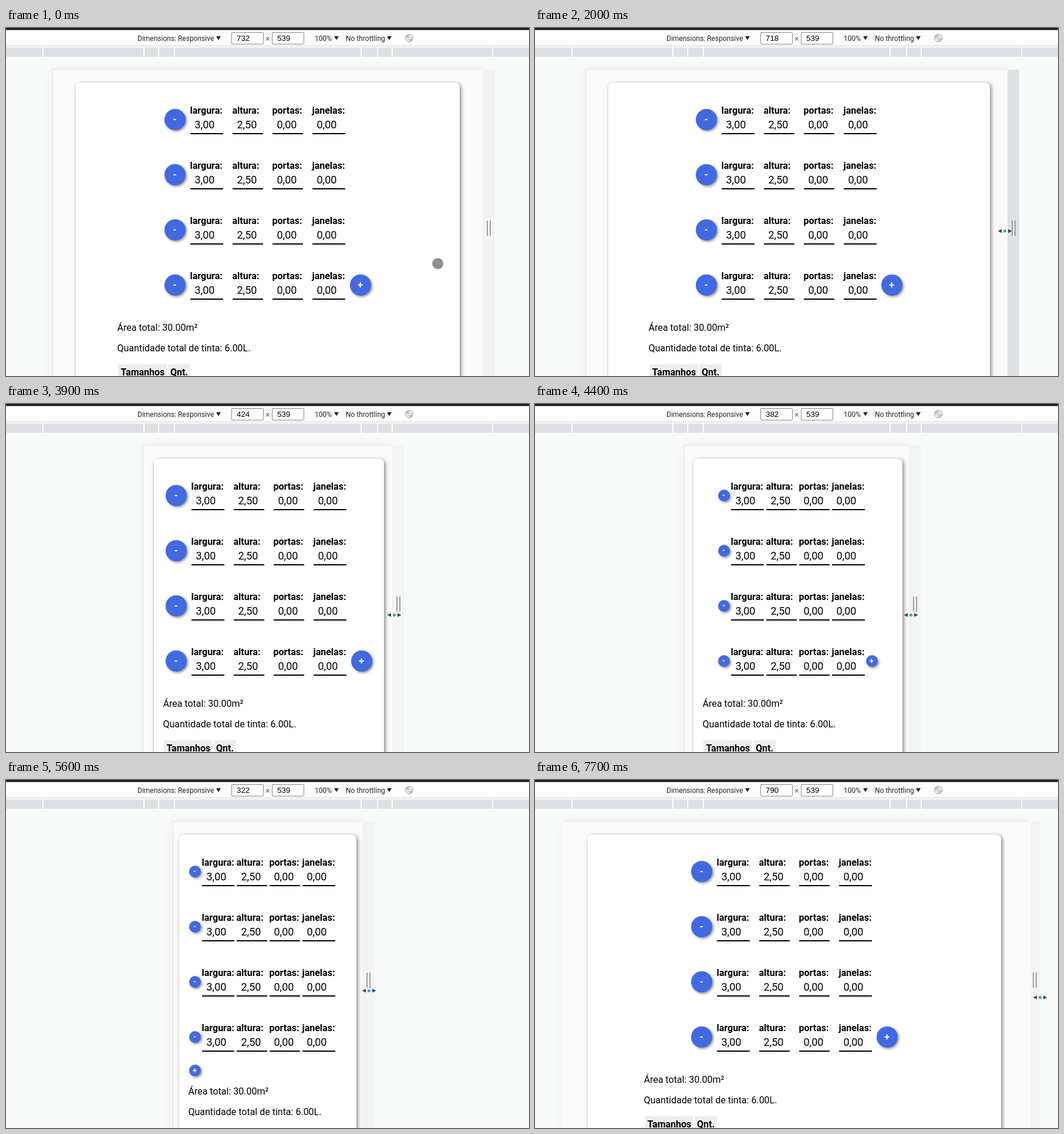
Write an HTML page that moves like this. It is 891 px wide and 593 px high and loops after 8 s.

```html
<!DOCTYPE html>
<html lang="pt">
<head>
<meta charset="utf-8">
<title>Responsive form</title>
<style>
html, body { margin: 0; width: 100%; height: 100%; overflow: hidden; }
body { position: relative; background: #f8faf9; font: 16px Roboto, sans-serif; color: #000; }
div, span, svg { position: absolute; white-space: nowrap; }
svg { left: 0; top: 0; }
#tools { width: 891px; height: 49px; background: #fff; font-size: 12px; color: #202124; }
#tools span { top: 11px; }
.field { top: 7px; width: 53px; height: 19px; border: 1px solid #85858a; border-radius: 2px; background: #fff;
  font: 13.333px "Liberation Sans", Arial, sans-serif; color: #000; }
#tools .field span { left: 8px; top: 2px; }
#frame, #bar, #page { top: 71px; height: 539px; }
#frame { box-shadow: -1px -1px 0 #e2e3e3, 0 0 20px rgba(0,0,0,.05); }
#bar { width: 20px; background: #f1f3f4; }
#bar.hover { background: #dee1e6; }
#bar i { position: absolute; top: 257px; width: 2px; height: 26px; background: #a0a0a0; }
#page { background: #fafafa; overflow: hidden; }
#content { top: -71px; }
#card { top: 93px; height: 600px; background: #fff; border-radius: 8px; box-shadow: 2px 2px 6px rgba(0,0,0,.5); }
.row { left: -176px; display: flex; align-items: center; }
.row > div { position: relative; flex: none; }
.btn { width: 36px; height: 36px; border-radius: 50%; background: #4169e1; color: #fff; font-weight: bold;
  line-height: 36px; text-align: center; box-shadow: 2px 2px 4px rgba(0,0,0,.45); }
.col { width: 52px; height: 48px; margin: 0 8px; border-bottom: 2px solid #000; }
.wide { width: 56px; }
.col b { position: absolute; left: 0; }
.col span { left: 8px; top: 23px; font-size: 18px; }
.small .row { left: -136px; }
.small .btn { width: 20px; height: 20px; font-size: 13.333px; line-height: 20px; }
.small .col { margin: 0 2px; }
.wrap .row { left: -134px; }
.wrap .btn + .wide { width: 55px; }
.wrap .row > .plus { position: absolute; left: 0; top: 72px; }
.wrap #sum { top: 20px; }
.th { top: 573px; height: 26px; background: #ededed; font-weight: bold; }
.th span { left: 4.5px; top: 4px; }
</style>
</head>
<body>
<div id="tools">
  <svg id="chrome" width="891" height="49"></svg>
  <span style="left:224px">Dimensions: Responsive</span>
  <div class="field" style="left:384px"><span id="size"></span></div>
  <span style="left:442px;font-size:14px;top:10px;color:#5f6368">×</span>
  <div class="field" style="left:453px"><span>539</span></div>
  <span style="left:526px">100%</span>
  <span style="left:579px">No throttling</span>
</div>
<div id="frame"></div>
<div id="bar"><i style="left:7px"></i><i style="left:12px"></i></div>
<div id="page"><div id="content">
  <div id="card"></div>
  <div id="rows"></div>
  <div id="sum">
    <span style="top:501px">Área total: 30.00m²</span>
    <span style="top:536px">Quantidade total de tinta: 6.00L.</span>
    <div class="th" style="left:1.5px;width:82.5px"><span>Tamanhos</span></div>
    <div class="th" style="left:86px;width:38px"><span>Qnt.</span></div>
  </div>
</div></div>
<svg width="891" height="593">
  <circle id="dot" r="9.5" fill="#909090"/>
  <g id="arrows">
    <path d="M-12 0l6.5-3.3v6.6zM12 0l-6.5-3.3v6.6z" fill="#444"/>
    <circle r="2.6" fill="#3a9fe0"/>
  </g>
</svg>
<script>
const $ = id => document.getElementById(id);
const MID = 445.5, LOOP = 8000, GRAB = 800, PULL = 1300, FLICK = 3400, GROW = 6600;

// toolbar, with gaps in the ruler at the usual device widths
const rect = (x, y, w, h, c) => `<rect x="${x}" y="${y}" width="${w}" height="${h}" fill="${c}"/>`;
const gap = x => rect(Math.round(x), 33, 2, 16, '#fff');
$('chrome').innerHTML = rect(0, 0, 891, 3.5, '#1c1b22') + rect(0, 30, 891, 1, '#cacdd1') +
  rect(0, 33, 891, 16, '#dde1e6') +
  [320, 375, 425, 768].map(w => gap(446 - w / 2) + gap(444 + w / 2)).join('') +
  [358, 559, 649].map(x => `<path d="M${x} 14h8l-4 6.5z" fill="#202124"/>`).join('') +
  `<g fill="none" stroke="#777" stroke-width=".9"><circle cx="687" cy="17" r="6.2"/>
   <rect x="684.5" y="12.5" width="5" height="9" rx="1" transform="rotate(-45 687 17)"/>
   <path d="M682.6 12.6l8.8 8.8"/></g>`;

// four identical form rows, the last with an add button
const col = (name, val, kind = '') => `<div class="col ${kind}"><b>${name}:</b><span>${val}</span></div>`;
const cols = col('largura', '3,00', 'wide') + col('altura', '2,50') + col('portas', '0,00') +
  col('janelas', '0,00', 'wide');
for (let i = 0; i < 4; i++) {
  const plus = i == 3 ? '<div class="btn plus">+</div>' : '';
  $('rows').innerHTML += `<div class="row" style="top:${131 + i * 94}px"><div class="btn">-</div>${cols}${plus}</div>`;
}

// drag: time, viewport width, pointer y
const keys = [
  [GRAB, 732, 370], [1000, 732, 340.5], [PULL, 732, 340.5], [2000, 718, 346], [2500, 678, 355.5],
  [3300, 678, 355.5], [3900, 424, 359.5], [5000, 332, 359.5], [5700, 320, 359], [6000, 308, 358],
  [6500, 308, 358], [GROW, 320, 357.5], [6900, 470, 361], [7700, 790, 370.5]
];

function pose(t) {
  const i = keys.findIndex(k => k[0] >= t);
  if (i < 1) return keys[0];
  const a = keys[i - 1], b = keys[i], p = (t - a[0]) / (b[0] - a[0]);
  return a.map((v, j) => v + (b[j] - v) * p);
}

function place(id, x, w) {
  $(id).style.left = x + 'px';
  if (w) $(id).style.width = w + 'px';
}

function draw() {
  // the screen refreshes in steps, slower while the page grows
  const now = performance.now() % LOOP, [from, step] = now < GROW ? [0, 100] : [GROW, 275];
  const t = from + Math.floor((now - from) / step) * step;
  let [, w, y] = pose(t);
  w = 2 * Math.round(w / 2);

  // the layout trails behind the width being dragged
  const grows = t >= GROW, dir = t <= PULL ? 0 : grows ? -1 : 1;
  const lag = dir * Math.round(Math.sqrt(Math.max(0, w - 320) / 26));
  const left = MID - w / 2, spill = Math.max(0, -lag), view = w + 2 * lag;
  const card = 2 * Math.round(150 + .43 * (Math.max(w, view) - 320));

  $('size').textContent = w;
  place('frame', left, w);
  place('bar', left + w);
  $('bar').className = t >= GRAB && t < FLICK ? 'hover' : '';
  place('page', left - spill, w + 2 * spill);
  place('content', MID + lag - left + spill);
  $('content').className = (view < 400 ? 'small' : '') + (view < 324 ? ' wrap' : '');
  place('card', -card / 2, card);
  place('sum', -Math.min(256, card / 2 - 16));

  const drag = t >= GRAB;
  let x = left + w + 10 + (grows ? 10 : 2 - 4 * lag);
  if (!drag) {
    x = 735.5 + .0091 * t ** 1.4;
    y = 401.5 + 20 * Math.sin(Math.PI * t / GRAB);
  }
  $('dot').style.display = drag ? 'none' : '';
  $('arrows').style.display = drag ? '' : 'none';
  $(drag ? 'arrows' : 'dot').setAttribute('transform', `translate(${x} ${y})`);
  requestAnimationFrame(draw);
}
draw();
</script>
</body>
</html>
```
